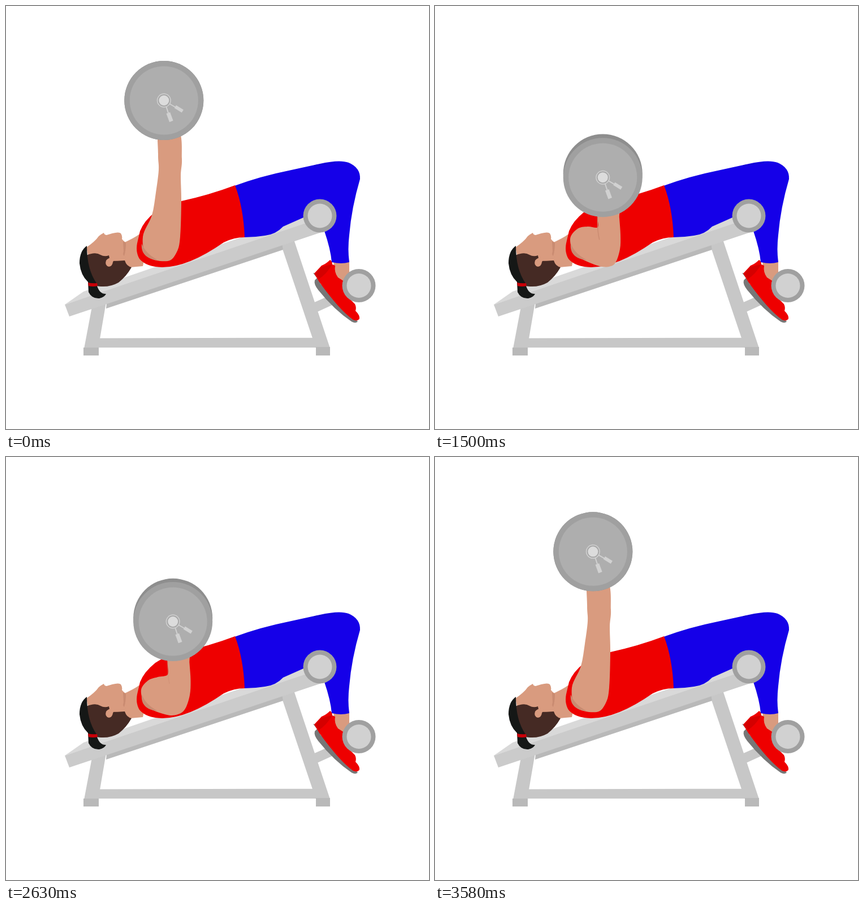
These frames come from a looping animation (748 by 748 pixels, 3620 ms). An HTML page with a canvas:

```html
<!DOCTYPE html>
<html lang="en">
<head>
<meta charset="utf-8">
<title>Incline press</title>
<style>
html, body { margin: 0; width: 100%; height: 100%; overflow: hidden; background: #fff; }
canvas { display: block; }
</style>
</head>
<body>
<canvas id="stage" width="748" height="748"></canvas>
<script>
const ctx = document.getElementById('stage').getContext('2d');
const LOOP = 3620, FRAMES = 87, LOWER_AT = 3, LIFT_AT = 50, TRAVEL = 171;
const SKIN = '#d99b7f', SHADE = '#c98b71', RED = '#ee0000', BLUE = '#1500e8';
const RIM = '#a0a0a0', STEEL = '#c7c7c7', FOOT = '#b9b9b9', LIGHT = '#d1d1d1';

function fill(color, path) {
  ctx.fillStyle = color;
  ctx.fill(new Path2D(path));
}

function disc(x, y, r, color) {
  ctx.fillStyle = color;
  ctx.beginPath();
  ctx.arc(x, y, r, 0, Math.PI * 2);
  ctx.fill();
}

function line(color, width, x1, y1, x2, y2) {
  ctx.strokeStyle = color;
  ctx.lineWidth = width;
  ctx.beginPath();
  ctx.moveTo(x1, y1);
  ctx.lineTo(x2, y2);
  ctx.stroke();
}

function drawBench() {
  fill(STEEL, 'M152 532L177 524L163 606H138ZM163 587.5L548 586.5V604H163ZM486 421L509 413L573 605H548ZM543 525L602 499L607 515L550 541Z');
  fill(FOOT, 'M137 604H164V618H137ZM548 603H573V618H548ZM178 524L488 420L490 431L177 535Z');
  fill('#d9d9d9', 'M104 528L137 505L530 370L548 382Z');
  fill('#cbcbcb', 'M104 528L542 380L558 400L112 549Z');
}

function drawLegs() {
  fill('#777', 'M543 472L550 474L556 491L582 518L622 558Q618 562 611 558Q580 537 552 502Q544 492 546 485L550 481Z');
  fill(SKIN, 'M579 450H607V478L594 489L581 478Z');
  fill(RED, 'M573 449Q577 451 577 457L582 459Q580 471 587 480L601 489L605 515L617 527Q620 533 618 539Q626 547 625 553Q622 558 614 555Q590 538 554 488L545 473L558 459Q566 456 573 449Z');
  fill('#d50000', 'M577 457Q566 475 553 483L546 473L558 461Z');
  fill(BLUE, 'M404 318Q450 301 500 291L555 279Q590 271 606 277Q627 286 626 306Q611 357 607 405Q604 430 607 453Q593 457 576 453Q574 430 563 398L540 370L526 374L490 390Q477 404 458 406Q440 409 421 409Z');
  line('#1300cf', 1.5, 545, 282, 582, 277);
}

function drawHead() {
  fill(SKIN, 'M205 420Q226 411 238 402L246 440L242 460L220 462L195 450Z');
  fill(SKIN, 'M142 427Q158 416 164 407Q169 403 173 401Q174 405 178 405L188 402Q200 399 203 402Q206 407 205 412Q209 417 212 418L213 440L205 463H150Z');
  fill(SHADE, 'M207 416L212 419Q212 433 209 442Q206 440 208 434Z');
  fill('#452a24', 'M142 441Q158 434 167 440Q174 444 182 441L184 451Q198 451 210 450Q213 460 222 462Q213 478 199 489Q185 497 168 496Q155 496 146 486Z');
  fill(SKIN, 'M192 446Q183 443 177 450Q174 459 182 461Q188 460 189 453Z');
  fill('#151716', 'M143 424Q130 433 130 455Q132 476 145 488L146 506Q152 518 165 517Q174 515 177 509Q166 510 161 495L160 490Q143 466 143 424Z');
  fill('#c90008', 'M145 489Q152 491 161 490L162 495Q154 497 146 495Z');
}

function drawTorso() {
  fill(RED, 'M237 398Q244 380 264 364Q280 353 310 345Q360 334 405 317Q420 357 422 409Q403 409 385 418Q322 462 276 462Q247 461 236 447Q228 434 233 415Z');
}

// Arm outlines at four depths of the bar, starting at the inner wrist.
const poses = [
  [0, [271,200, 269,262, 270,290, 265,330, 258,370, 242,408, 250,443, 286,451, 302,435, 308,408, 310,345, 309,300, 311,270, 306,220]],
  [88, [281,290, 281,335, 280,365, 264,386, 247,400, 238,418, 250,444, 283,449, 299,437, 311,418, 319,394, 322,365, 320,335, 317,300]],
  [136, [287,335, 287,372, 288,391, 270,390, 252,394, 239,412, 249,440, 284,458, 306,461, 319,454, 327,430, 328,405, 326,375, 324,345]],
  [157, [290,355, 290,390, 289,398, 270,390, 252,394, 239,412, 249,440, 283,466, 310,474, 324,466, 330,440, 330,415, 328,392, 326,365]]
];

function armOutline(depth) {
  const i = depth < 88 ? 0 : depth < 136 ? 1 : 2;
  const [d0, from] = poses[i], [d1, to] = poses[i + 1];
  const k = (depth - d0) / (d1 - d0);
  const points = [];
  for (let j = 0; j < from.length; j += 2) {
    points.push([0, 1].map(a => from[j + a] + (to[j + a] - from[j + a]) * k));
  }
  return points;
}

// Closed curve through all points.
function fillSmooth(points, color) {
  const at = i => points[(i + points.length) % points.length];
  ctx.beginPath();
  ctx.moveTo(...points[0]);
  points.forEach((p, i) => {
    const before = at(i - 1), next = at(i + 1), after = at(i + 2);
    ctx.bezierCurveTo(
      p[0] + (next[0] - before[0]) / 6, p[1] + (next[1] - before[1]) / 6,
      next[0] - (after[0] - p[0]) / 6, next[1] - (after[1] - p[1]) / 6,
      ...next);
  });
  ctx.fillStyle = color;
  ctx.fill();
}

function drawArm(depth, x, y) {
  fillSmooth(armOutline(depth), SKIN);
  fill(SHADE, 'M240 420Q247 438 268 449Q249 448 242 435Q239 428 240 420Z');
  if (depth > 115) {
    ctx.globalAlpha = Math.min(1, (depth - 115) / 20);
    ctx.strokeStyle = SHADE;
    ctx.lineWidth = 1.4;
    ctx.stroke(new Path2D(`M${x - 9} ${y + 70}Q${x - 10} ${y + 95} ${x - 6} ${y + 110}`));
    ctx.globalAlpha = 1;
  }
}

function drawPlate(x, y, depth) {
  disc(x, y - depth * 0.05, 70, '#8e8e8e');
  disc(x, y, 70, RIM);
  disc(x, y, 60.5, '#aeaeae');
  line(LIGHT, 2, x + 4, y + 11, x + 8, y + 23);
  line(LIGHT, 7, x + 7.5, y + 22, x + 13, y + 37);
  line(LIGHT, 2, x + 10, y + 6, x + 22, y + 13);
  line(LIGHT, 6, x + 20, y + 11, x + 33, y + 19);
  disc(x, y, 12.5, LIGHT);
  disc(x, y, 11, '#a8a8a8');
  disc(x, y, 9, '#dcdcdc');
}

function drawRoller(x, y) {
  disc(x, y, 29.5, RIM);
  disc(x, y, 21.5, LIGHT);
}

const ease = u => (1 - Math.cos(Math.PI * Math.min(1, Math.max(0, u)))) / 2;

function barDepth(frame) {
  return TRAVEL * (frame < LIFT_AT
    ? ease((frame - LOWER_AT) / (LIFT_AT - LOWER_AT))
    : 1 - ease((frame - LIFT_AT) / (FRAMES - LIFT_AT)));
}

function draw(time) {
  const frame = Math.floor((time % LOOP) * FRAMES / LOOP);
  const depth = barDepth(frame);
  const x = 279.3 + depth * 0.128, y = 167 + depth;
  ctx.fillStyle = '#fff';
  ctx.fillRect(0, 0, 748, 748);
  drawBench();
  drawLegs();
  drawRoller(555, 371);
  drawRoller(624, 494.5);
  drawHead();
  drawTorso();
  drawArm(depth, x, y);
  drawPlate(x, y, depth);
}

const start = performance.now();
function tick() {
  draw(performance.now() - start);
  requestAnimationFrame(tick);
}
tick();
</script>
</body>
</html>
```
